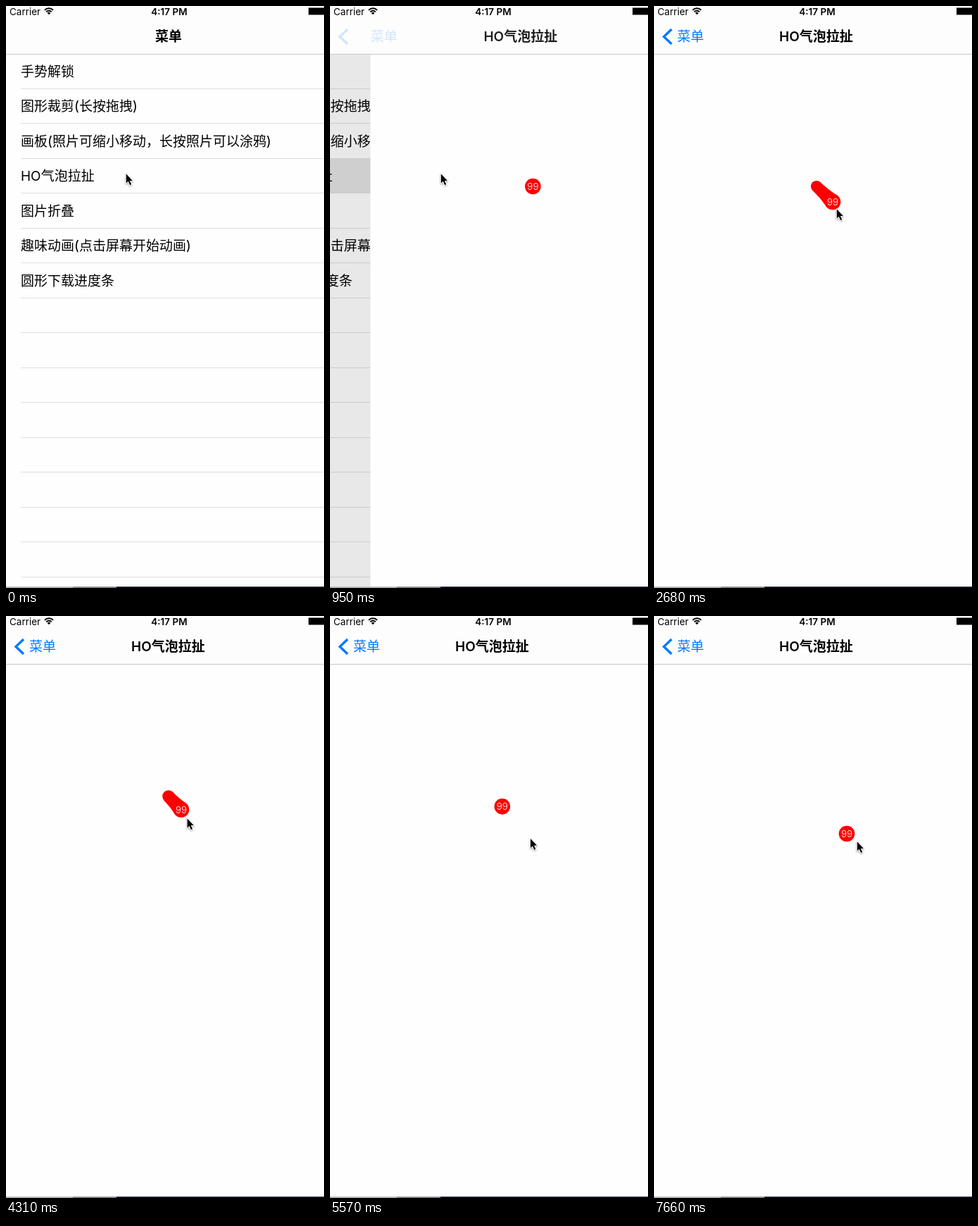
Animation, 452 px wide and 826 px high, one loop 8 s. Source, as an HTML page:

```html
<!DOCTYPE html>
<html lang="zh-CN">
<head>
<meta charset="utf-8">
<title>气泡拉扯</title>
<style>
  html, body { margin: 0; width: 100%; height: 100%; overflow: hidden; background: #fefefe; }
  svg { display: block; width: 452px; height: 826px; }
  text { font: 400 19px Inter, "Noto Sans CJK SC", "Noto Sans CJK", sans-serif; white-space: pre; }
  .status { font-size: 13.5px; }
  .bold { font-weight: 600; }
  .count { font-size: 13.5px; font-weight: 300; fill: #fff; text-anchor: middle; }
</style>
</head>
<body>
<svg viewBox="0 0 452 826">
  <g id="list">
    <rect width="452" height="826" fill="#fefefe"/>
    <rect id="pressed" y="216" width="452" height="50" fill="#e2e2e2"/>
    <g id="rows"></g>
  </g>
  <rect id="dim" y="69" width="452" height="757"/>
  <g id="page">
    <rect width="452" height="826" fill="#fefefe"/>
    <path id="neck" fill="#f00"/>
    <circle id="root" cx="231" cy="256" fill="#f00"/>
    <g id="bubble">
      <circle r="11.3" fill="#f00"/>
      <text class="count" y="5">99</text>
    </g>
  </g>

  <rect width="452" height="68" fill="#fdfdfd"/>
  <rect y="68" width="452" height="1" fill="#c9c9c9"/>
  <text class="status" x="5" y="12.7">Carrier</text>
  <text class="status bold" x="232" y="12.7" text-anchor="middle">4:17 PM</text>
  <g fill="none" stroke="#000" stroke-width="2">
    <path d="M54.9 5.9a8.6 8.6 0 0 1 12.2 0M57.2 8.2a5.4 5.4 0 0 1 7.6 0"/>
    <path d="M61 12.3l-2.3-2.3a3.2 3.2 0 0 1 4.6 0z" fill="#000" stroke="none"/>
  </g>
  <rect x="430" y="2.5" width="22" height="10"/>

  <text id="oldTitle" class="bold" y="50">菜单</text>
  <text id="newTitle" class="bold" y="50">HO气泡拉扯</text>
  <g id="back" fill="#007aff">
    <path d="M25 33L14 43.5L25 54" fill="none" stroke="#007aff" stroke-width="3.4"/>
    <text id="backLabel" y="50">菜单</text>
  </g>

  <rect y="824" width="95" height="2" fill="#b4b4b4"/>
  <rect x="95" y="824" width="62" height="2" fill="#858585"/>
  <rect x="157" y="824" width="295" height="2" fill="#101c2a"/>

  <g id="cursor">
    <path d="M.8 .3v13.3l2.9-2.8 2.4 5.3 2.1-.9-2.3-5.1 4-.2z" stroke="#fff" stroke-width="1.8"
      stroke-linejoin="round" paint-order="stroke" style="filter:drop-shadow(0 1px 1px #0006)"/>
  </g>
</svg>
<script>
const LOOP = 8000, WIDTH = 452, ROW = 49.5, TOP = 67.5;
const HOME = [231, 256], RADIUS = 11.3, SNAP = 67, RETURN = 230;
const TAP = 690, PUSH = 740, STIFF = 0.017;

// reach: bubble's final offset from home; grab and hold: pointer's offset from the bubble
const pulls = [
  { free: 1040, reach: [0, 0], hold: [-74, -18] },
  { start: 1600, end: 2680, free: 3100, reach: [23, 22], grab: [3, 4], hold: [5, 10], pow: 1 },
  { start: 3910, end: 5110, free: 5400, reach: [54, 56], grab: [3, 2], hold: [9, 15], pow: 1 },
  { start: 6460, end: 7660, free: LOOP, reach: [43, 53], grab: [2, 1], hold: [14, 11], pow: 0.6 }
];

const el = id => document.getElementById(id);
const span = (t, a, b) => Math.min(1, Math.max(0, (t - a) / (b - a)));
const mix = (a, b, f) => a.map((v, i) => v + (b[i] - v) * f);
const add = (a, b) => a.map((v, i) => v + b[i]);
const move = p => ({ transform: `translate(${p.join(" ")})` });

function set(id, attrs) {
  for (const name in attrs) el(id).setAttribute(name, attrs[name]);
}

const items = ["手势解锁", "图形裁剪(长按拖拽)", "画板(照片可缩小移动，长按照片可以涂鸦)", "HO气泡拉扯",
  "图片折叠", "趣味动画(点击屏幕开始动画)", "圆形下载进度条"];
let rows = "";
for (let i = 0; i < 15; i++) {
  const y = TOP + ROW * i;
  if (items[i]) rows += `<text x="21" y="${Math.floor(y + 32.5)}">${items[i]}</text>`;
  rows += `<rect x="21" y="${Math.floor(y + ROW)}" width="431" height="1" fill="#dedede"/>`;
}
el("rows").innerHTML = rows;

// Sticky neck between the shrinking root and the bubble
function neckPath([dx, dy], r) {
  const d = Math.hypot(dx, dy);
  const at = (f, k) => `${HOME[0] + dx * f - dy / d * k} ${HOME[1] + dy * f + dx / d * k}`;
  return `M${at(0, r)}L${at(0, -r)}Q${at(.5, -r)} ${at(1, -RADIUS)}` +
    `L${at(1, RADIUS)}Q${at(.5, r)} ${at(0, r)}Z`;
}

function drawPush(t) {
  const x = Math.max(0, t - PUSH) * STIFF;
  const rest = (1 + x) * Math.exp(-x), done = 1 - rest;
  set("list", move([-140 * done, 0]));
  set("pressed", { opacity: t >= TAP ? 1 : 0 });
  set("dim", { opacity: .1 * done });
  set("page", move([WIDTH * rest, 0]));
  set("oldTitle", { x: 212 - 179 * done, opacity: Math.max(0, 1 - 1.5 * done) });
  set("newTitle", { x: 178 + 318 * rest, opacity: done });
  set("back", { opacity: done ** 13 });
  set("backLabel", { x: 33 + 194 * rest });
}

function drawPull(t) {
  const i = Math.max(1, pulls.findIndex(p => t < p.free));
  const pull = pulls[i], last = pulls[i - 1];
  const held = t >= pull.start;
  let offset, tip;
  if (held) {
    const p = span(t, pull.start, pull.end);
    offset = mix([0, 0], pull.reach, p ** pull.pow);
    tip = add(offset, mix(pull.grab, pull.hold, 1 - (1 - p) ** 4));
  } else {
    offset = mix(last.reach, [0, 0], span(t, last.free, last.free + RETURN));
    tip = mix(add(last.reach, last.hold), pull.grab, span(t, last.free, pull.start));
    if (i === 1) tip[0] += 13 * (1 - span(t, 180, 270));
  }
  const d = Math.hypot(...offset), stuck = held && d > 0 && d < SNAP;
  const r = stuck ? RADIUS - d / 10 : 0;
  set("bubble", move(add(HOME, offset)));
  set("root", { r });
  set("neck", { d: stuck ? neckPath(offset, r) : "" });
  set("cursor", move(add(HOME, tip)));
}

function frame() {
  const t = performance.now() % LOOP;
  drawPush(t);
  drawPull(t);
  requestAnimationFrame(frame);
}
frame();
</script>
</body>
</html>
```
